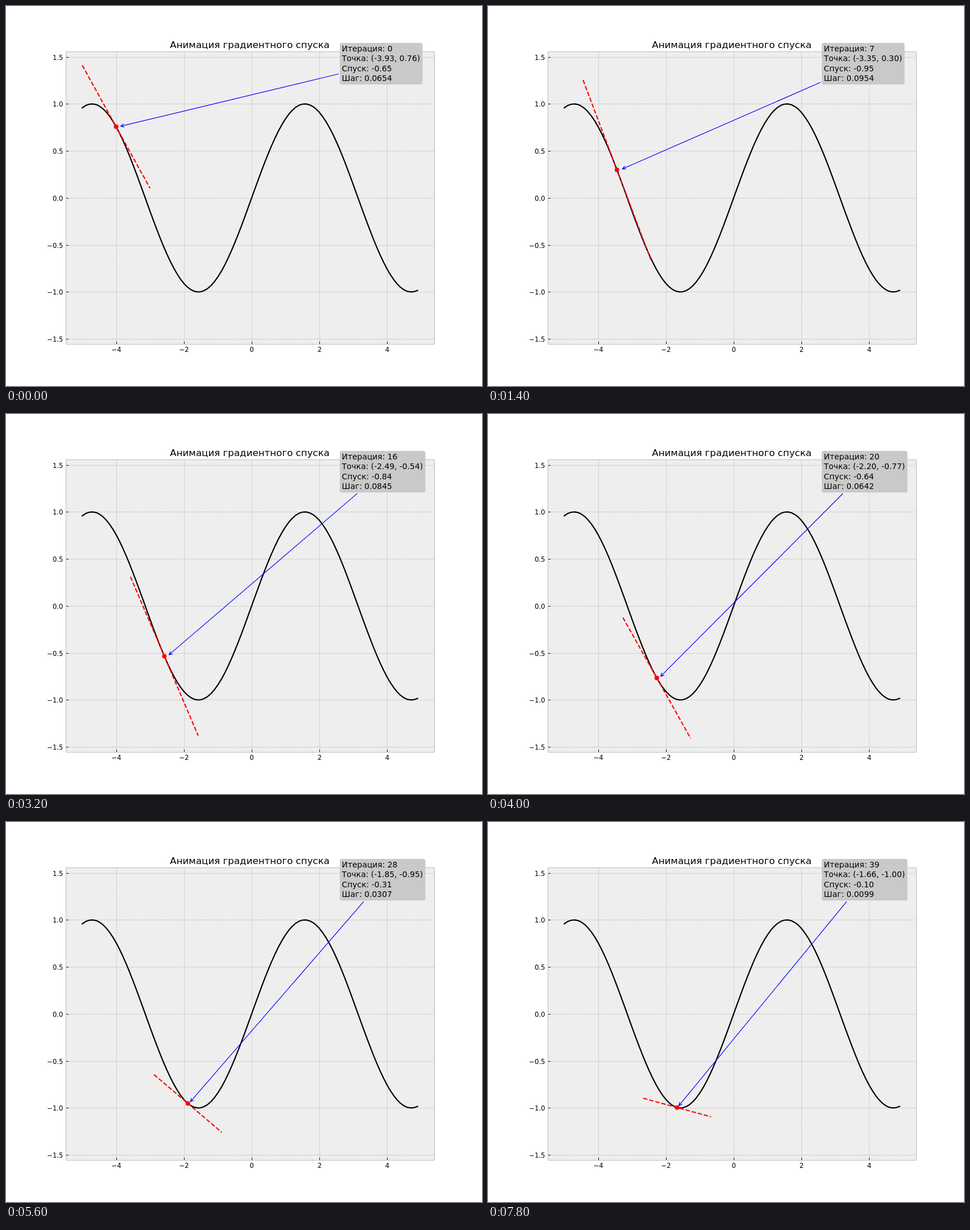
An HTML page that plays this animation: 837x669 px, repeating every 8000 ms.

```html
<!DOCTYPE html>
<html lang="ru">
<head>
<meta charset="utf-8">
<title>Градиентный спуск</title>
<style>
html, body { margin: 0; width: 100%; height: 100%; overflow: hidden; background: #fff; }
svg { display: block; width: 100vw; height: 100vh; font-family: "DejaVu Sans", sans-serif; }
</style>
</head>
<body>
<svg id="stage" viewBox="0 0 837 669"></svg>
<script>
const STEP_MS = 200, STEPS = 40, RATE = 0.1;
const BOX = { l: 104.625, t: 80.28, r: 753.3, b: 595.41 };
const X = x => 431.94 + x * 59.565;
const Y = y => 337.9 - y * 165.57;
const snap = v => Math.floor(v + 0.5) + 0.5;
const svg = document.getElementById('stage');

function set(node, attrs) {
  for (const k in attrs) node.setAttribute(k, attrs[k]);
  return node;
}
function add(tag, attrs, text) {
  const node = set(document.createElementNS('http://www.w3.org/2000/svg', tag), attrs);
  if (text !== undefined) node.textContent = text;
  return svg.appendChild(node);
}
const path = (stroke, width, attrs) =>
  add('path', { fill: 'none', stroke, 'stroke-width': width, ...attrs });
const label = (x, y, size, anchor, text) =>
  add('text', { x, y, 'font-size': size, 'text-anchor': anchor }, text);
const num = (v, digits) => v.toFixed(digits).replace('-', '\u2212');

const L = snap(BOX.l), T = snap(BOX.t), R = snap(BOX.r), B = snap(BOX.b);

// Axes
add('rect', { x: L, y: T, width: R - L, height: B - T, fill: '#eee' });
let grid = '', ticks = '';
for (let v = -4; v <= 4; v += 2) {
  const x = snap(X(v));
  grid += `M${x} ${B}V${T}`;
  ticks += `M${x} ${B}v-4.5`;
  label(X(v) + 0.3, 609, 11.57, 'middle', num(v, 0));
}
for (let v = -1.5; v <= 1.5; v += 0.5) {
  const y = snap(Y(v));
  grid += `M${L} ${y}H${R}`;
  ticks += `M${L} ${y}h4.5`;
  label(100.3, y + 4, 11.57, 'end', num(v, 1));
}
path('#b2b2b2', 0.7, { d: grid, 'stroke-dasharray': '2.57 1.11' });

// Function curve
let wave = '';
for (let i = 0; i < 100; i++) {
  const x = -5 + i * 0.1;
  wave += `${i ? 'L' : 'M'}${X(x).toFixed(2)} ${Y(Math.sin(x)).toFixed(2)}`;
}
path('#000', 2.2, { d: wave, 'stroke-linejoin': 'round', 'stroke-linecap': 'square' });

const dot = add('circle', { r: 4, fill: '#f00' });
const tangent = path('#f00', 2.1, { 'stroke-dasharray': '7.71 3.33' });
path('#000', 1, { d: ticks });
path('#bcbcbc', 1, { d: `M${L} ${T}H${R}V${B}H${L}Z` });
label(428.6, 73.5, 16.67, 'middle', 'Анимация градиентного спуска');

// Callout
const arrow = path('#00f', 1.2, { 'stroke-linecap': 'round', 'stroke-linejoin': 'round' });
const card = { x: 587, y: 65, h: 73.3 };
const panel = add('rect', { x: card.x, y: card.y, height: card.h, rx: 3.5, fill: '#c9c9c9' });
const lines = [79.6, 97.2, 114.8, 132.2].map(y => label(590.6, y, 13.89, 'start', ''));

function drawArrow(tx, ty, width) {
  const cx = card.x + width / 2, cy = card.y + card.h / 2;
  const dx = tx - cx, dy = ty - cy, len = Math.hypot(dx, dy);
  const ux = dx / len, uy = dy / len;
  const edge = Math.min(width / 2 / Math.abs(ux), card.h / 2 / Math.abs(uy));
  // Distance along the shaft and sideways offset
  const at = (d, s) => `${(cx + ux * d - uy * s).toFixed(2)} ${(cy + uy * d + ux * s).toFixed(2)}`;
  const end = len - 4.1;
  set(arrow, {
    d: `M${at(edge + 2.78, 0)}L${at(end, 0)}M${at(end - 5.55, 2.78)}L${at(end, 0)}L${at(end - 5.55, -2.78)}`
  });
}

function draw(step) {
  let x = -4;
  for (let i = 0; i < step; i++) x -= RATE * Math.cos(x);
  const y = Math.sin(x), slope = Math.cos(x), next = x - RATE * slope;
  set(dot, { cx: X(x), cy: Y(y) });
  set(tangent, { d: `M${X(x - 1)} ${Y(y - slope)}L${X(x + 1)} ${Y(y + slope)}` });
  const width = y < 0 ? 150.5 : 145.5;
  set(panel, { width });
  drawArrow(X(next), Y(y), width);
  [
    `Итерация: ${step}`,
    `Точка: (${next.toFixed(2)}, ${y.toFixed(2)})`,
    `Спуск: ${slope.toFixed(2)}`,
    `Шаг: ${Math.abs(RATE * slope).toFixed(4)}`
  ].forEach((text, i) => { lines[i].textContent = text; });
}

let shown = -1;
function tick() {
  const step = Math.floor(performance.now() / STEP_MS) % STEPS;
  if (step !== shown) draw(shown = step);
  requestAnimationFrame(tick);
}
tick();
</script>
</body>
</html>
```
